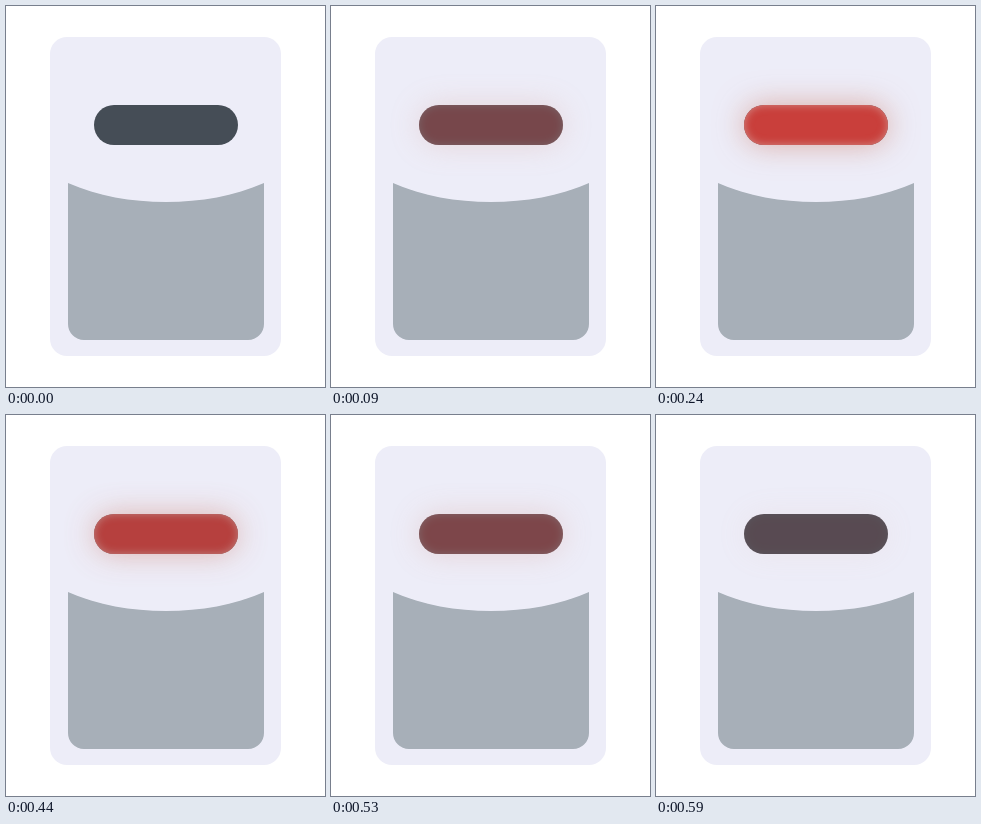
Recreate the animation shown at these times as an HTML page. Size 319x381 px, loop 620 ms.

```html
<!DOCTYPE html>
<html lang="en">
<head>
<meta charset="utf-8">
<style>
html, body { margin: 0; width: 100%; height: 100%; overflow: hidden; background: #fff; }
svg { position: absolute; left: 0; top: 0; }
.lamp, .glow { position: absolute; width: 144px; height: 40px; border-radius: 20px; }
.lamp { left: 88px; top: 99px; background: #454d56; }
.glow {
  background: #c93f3b;
  box-shadow: 0 0 30px rgba(214, 155, 145, .8), inset 0 0 9px rgba(215, 180, 175, .65);
  opacity: 0;
}
</style>
</head>
<body>
<svg width="319" height="381">
  <rect x="44" y="31" width="231" height="319" rx="17" fill="#ededf8"/>
  <path d="M62 177C92 190 125 196 160 196S228 190 258 177V318a16 16 0 0 1-16 16H78a16 16 0 0 1-16-16Z" fill="#a7afb8"/>
</svg>
<div class="lamp"><div class="glow"></div></div>
<script>
const LOOP = 620, STEP = 30, FADE_START = 440;
const glow = document.querySelector('.glow');

// Light level: eight steps up, a hold, then seven steps down.
function level(t) {
  if (t < FADE_START) return Math.min(Math.floor(t / STEP) / 8, 1);
  return 1 - (Math.floor((t - FADE_START) / STEP) + 1) / 7;
}

function draw() {
  glow.style.opacity = level(performance.now() % LOOP);
  requestAnimationFrame(draw);
}
draw();
</script>
</body>
</html>
```
